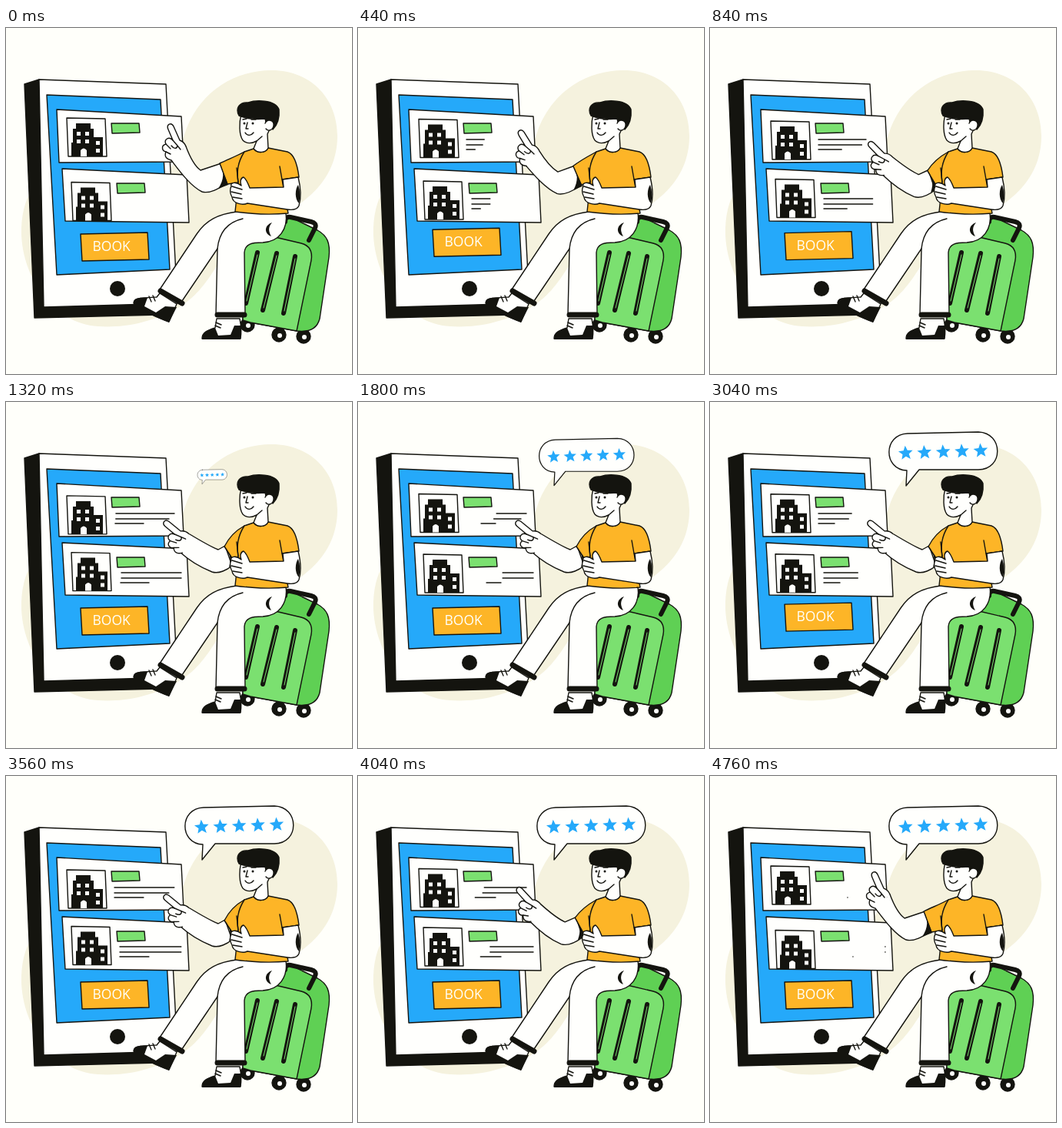
Write an HTML page that moves like this. It is 450 by 450 pixels and loops after 4800 ms.

```html
<!DOCTYPE html>
<html lang="en">
<head>
<meta charset="utf-8">
<title>Hotel booking</title>
<style>
html, body { margin: 0; width: 100%; height: 100%; overflow: hidden; background: #fffffa; }
svg { display: block; width: 100%; height: 100%; }
.l { stroke: #14140f; stroke-width: 1.4; stroke-linejoin: round; stroke-linecap: round; fill: none; }
.thick { stroke-width: 6; }
.w { fill: #fffffd; }
.k { fill: #14140f; }
.g { fill: #7be070; }
.side { fill: #5fd054; }
.b { fill: #25a9fa; }
.y { fill: #fdb527; }
text { font: 400 17.5px "Open Sans", sans-serif; fill: #fffffa; }
</style>
</head>
<body>
<svg viewBox="0 0 450 450">
  <defs>
    <g id="house">
      <path class="l" d="M0 0L50 1L52 50H2Z"/>
      <path class="k" d="M6 50V32H8V14H12V7H31V14H35V25H47V50Z"/>
      <path class="w" d="M13 18h5v5h-5zM24 18h5v5h-5zM13 28h5v5h-5zM24 28h5v5h-5zM18 50V42Q22 37 26 42V50zM38 30h5v5h-5zM38 40h5v5h-5z"/>
    </g>
  </defs>

  <path fill="#f5f2de" d="M345 55C400 55 431 95 431 140C431 200 385 235 330 255C280 275 275 330 230 360C190 385 150 390 120 388C60 385 18 320 20 260C24 190 60 190 120 200C200 240 215 190 235 130C255 80 300 55 345 55Z"/>

  <!-- phone -->
  <path class="l k" d="M24 73L43 67L60 355L205 357L200 373L37 377Z"/>
  <path class="l w" d="M43 67L208 73L223 358L49 363Z"/>
  <path class="l b" d="M53 87L201 93L213 314L66 321Z"/>
  <circle class="k" cx="145" cy="339" r="10"/>
  <g id="button">
    <path class="l y" d="M97 268L184 266L186 301L99 303Z"/>
    <text x="112.500" y="290">BOOK</text>
  </g>
  <path class="l w" d="M66 106L228 115L231 174L69 175Z"/>
  <path class="l w" d="M73 183L235 191L238 253L77 251Z"/>
  <use id="upper" href="#house" x="79" y="117"/>
  <use id="lower" href="#house" x="85" y="200.500"/>
  <path class="l g" d="M137 124H173L174 136L138 137ZM144 202H180L181 214L145 215Z"/>
  <path id="lines" class="l"/>

  <!-- suitcase -->
  <g class="l k">
    <circle cx="314" cy="386" r="9"/><circle cx="355" cy="399" r="9"/><circle cx="387" cy="401" r="9"/>
  </g>
  <g class="w">
    <circle cx="315" cy="387" r="3"/><circle cx="356" cy="400" r="3"/><circle cx="388" cy="402" r="3"/>
  </g>
  <path class="l side" d="M308 380L309 285C325 262 345 248 372 247L405 263C418 270 422 280 420 298L408 378C405 390 395 396 378 394L318 383Z"/>
  <path class="l g" d="M308 380V276L350 272L384 280C395 283 399 290 397 302L378 394L318 383Z"/>
  <path class="l thick" d="M327 292L312 358M352 293L334 367M376 297L361 371"/>
  <path class="l" style="stroke:#7be070;stroke-width:1" d="M327 295L313 355M352 296L335 364M376 300L362 368"/>
  <path class="l thick" d="M394 276L402 260C404 255 401 253 397 252L370 246C365 245 363 248 363 252"/>

  <!-- shoes and trousers -->
  <path class="l w" d="M200 345L222 359L212 382C196 376 180 369 166 358C166 351 174 351 196 350Z"/>
  <path class="k" d="M166 359C165 351 172 350 184 351L180 362L195 370L207 362L222 363L212 383C196 377 180 370 166 359Z"/>
  <path class="l" d="M186 349L189 356M191 348L194 355"/>
  <path class="l w" d="M274 378H304C306 388 306 398 305 404H255C255 396 262 393 272 390Z"/>
  <path class="k" d="M255 405C254 396 262 393 272 390L276 400L292 399L297 387H305Q307 397 305 405Z"/>
  <path class="l" d="M272 387L279 390M273 383L280 386"/>
  <path class="l w" d="M300 239C276 242 260 250 248 268L200 340L229 355L275 287L273 373H311L310 292C311 281 319 279 334 279C355 278 367 262 364 240Z"/>
  <path class="l" d="M275 287C277 268 286 253 308 248"/>
  <path class="l thick" style="stroke-width:7" d="M201 342L229 358M275 373H310"/>
  <path class="k" d="M346 253C335 257 336 268 345 271C341 264 341 259 346 253Z"/>

  <!-- pointing arm -->
  <path id="arm" class="l w"/>
  <g id="hand">
    <path class="l w" d="M234 154C232 149 229 147 226 146L218 128C215 122 208 125 211 132L217 146C212 140 205 145 208 151C201 153 203 160 208 161C205 168 210 171 215 172"/>
    <path class="l" d="M217 146L223 153C222 158 218 157 215 153M208 151L214 157M208 161L214 164M223 153L227 158"/>
  </g>

  <!-- torso and resting arm -->
  <path id="sleeve" class="l y"/>
  <path id="shade" class="k"/>
  <path class="l y" d="M322 157C328 164 338 162 341 156L366 161C375 164 379 178 381 194L359 197L367 241C345 243 320 242 298 239L302 201C300 187 301 175 310 161Z"/>
  <path class="l" d="M302 201L300 182M359 197L356 180"/>
  <path class="l w" d="M360 197L380 194C383 206 384 221 381 231C379 236 373 237 366 236L314 228C307 231 295 228 294 220C291 215 291 209 293 206C291 201 299 199 306 205C304 200 305 195 309 194C313 197 315 203 317 208L361 207Z"/>
  <path class="k" d="M380 204C376 209 375 222 381 228Q384 215 380 204Z"/>
  <path class="l" d="M294 206L307 210M293 213L306 216M295 220L307 222"/>

  <!-- head -->
  <path class="l w" d="M306 112C303 123 303 139 308 146C313 151 320 150 326 147L322 157C328 164 338 162 341 156L340 138L349 118Z"/>
  <path class="l k" d="M303 114C298 105 303 96 315 97C323 94 350 92 355 106C356 117 353 126 347 132L339 127L337 118C327 119 313 118 303 114Z"/>
  <path class="l w" d="M337 124C340 117 349 120 348 127C347 133 341 135 338 131"/>
  <path class="l" d="M308 119L313 118M319 119L325 119M314 123L312 131L315 131M311 136C314 141 319 140 322 136M326 147L333 141"/>
  <g class="k"><circle cx="310" cy="124" r="1.500"/><circle cx="321" cy="124" r="1.500"/></g>

  <g id="bubble">
    <path class="l w" d="M257 41L349 39C382 40 382 88 349 88H272L255 109L256 89C225 88 225 42 257 41Z"/>
    <path id="stars" class="b"/>
  </g>
</svg>
<script>
const LOOP = 4800, STEP = 1200;
const el = id => document.getElementById(id);
const set = (id, name, value) => el(id).setAttribute(name, value);
const shiftY = (id, y) => set(id, 'transform', `translate(0 ${y})`);
const clamp = x => Math.min(1, Math.max(0, x));
const ease = x => (1 - Math.cos(Math.PI * clamp(x))) / 2;
const easeOut = x => 1 - (1 - clamp(x)) ** 3;

// Blend two paths that share the same commands.
const blend = (from, to, p) => {
  const ends = to.match(/\d+/g);
  let i = 0;
  return from.replace(/\d+/g, n => (+n + (ends[i++] - n) * p).toFixed(2));
};

const ARM = [
  'M234 154C240 170 246 180 253 185L280 176L288 202C278 208 265 216 255 213C240 206 225 185 215 172',
  'M239 172C254 181 268 189 276 192L285 187L294 213C288 218 277 224 268 221C253 215 238 206 226 195'];
const SLEEVE = [
  'M310 161C299 167 288 171 278 176L288 203L302 201L310 161',
  'M310 161C299 167 290 176 284 188L296 206L302 201L310 161'];
const SHADE = [
  'M278 176C284 186 284 197 276 209L289 204Z',
  'M284 187C291 195 293 204 290 215L299 210Z'];

// Left, right and height of each text line.
const LINES = [[141, 219, 145], [141, 212, 152], [141, 179, 158],
               [148, 228, 222], [148, 228, 229], [148, 186, 235]];

const star = (cx, cy) => 'M' + Array.from({ length: 10 }, (_, i) => {
  const r = i % 2 ? 4.3 : 9.8, a = i * Math.PI / 5 - 0.08;
  return `${cx + r * Math.sin(a)} ${cy - r * Math.cos(a)}`;
}).join('L') + 'Z';
set('stars', 'd', [0, 1, 2, 3, 4].map(i => star(254.5 + i * 24.4, 66.5 - i * 0.8)).join(''));

function draw(t) {
  const point = ease(t / STEP) - ease((t - 3 * STEP) / STEP);
  set('arm', 'd', blend(...ARM, point));
  set('sleeve', 'd', blend(...SLEEVE, point));
  set('shade', 'd', blend(...SHADE, point));
  set('hand', 'transform', `translate(${9 * point} ${22 * point}) rotate(${-27 * point} 222 162)`);

  const half = t % (2 * STEP);
  const head = ease(half / STEP), tail = ease(half / STEP - 1);
  const shown = head - tail;
  set('lines', 'd', shown < 0.001 ? '' : LINES.map(([a, b, y]) =>
    `M${a + (b - a) * tail} ${y}H${a + (b - a) * head}`).join(''));
  shiftY('upper', 5 * shown);
  shiftY('lower', -5 * shown);
  shiftY('button', -6 * Math.sin(Math.PI * clamp(half / 1000)) ** 2);

  set('bubble', 'transform',
    `translate(255 106) scale(${easeOut(t / STEP - 1)}) translate(-255 -106)`);
}

function tick() {
  draw(performance.now() % LOOP);
  requestAnimationFrame(tick);
}
tick();
</script>
</body>
</html>
```
